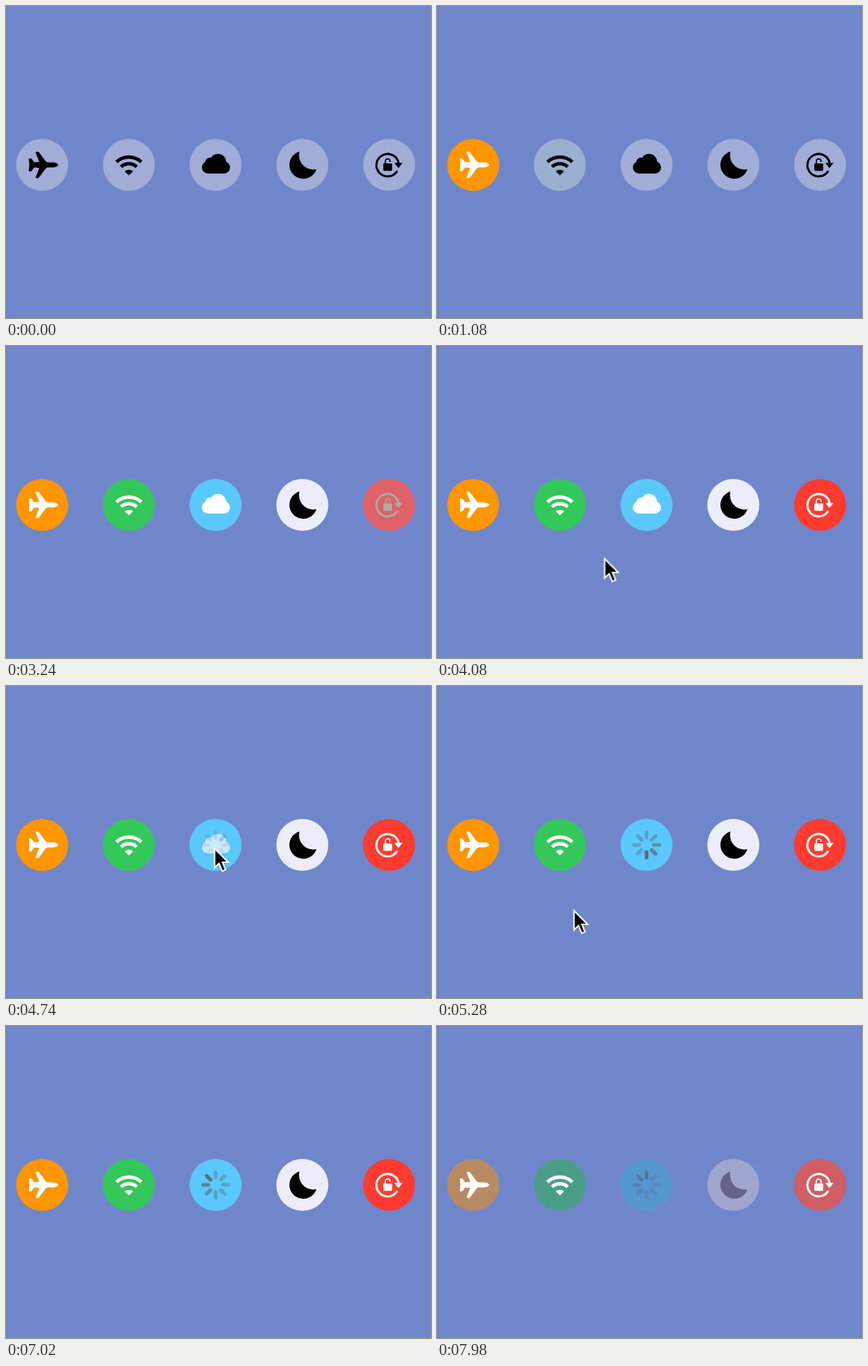
An HTML page for the animation above (8000 ms loop, 588x432 px).

```html
<!DOCTYPE html>
<html lang="en">
<head>
<meta charset="utf-8">
<title>Control toggles</title>
<style>
  html, body { margin: 0; width: 100%; height: 100%; overflow: hidden; background: #7086ca; }
  svg { display: block; width: 588px; height: 432px; }

  /* Each toggle: fill is the disc, color is the icon. */
  .toggle { animation: 8s linear infinite; fill: #a1acd7; color: #000; }
  .icon { fill: currentColor; }
  .line { fill: none; stroke: currentColor; }
  #plane { animation-name: plane; }
  #wifi { animation-name: wifi; }
  #cloud { animation-name: cloud; }
  #moon { animation-name: moon; }
  #lock { animation-name: lock; }

  @keyframes plane {
    0%, 4.25% { fill: #a1acd7; color: #000; animation-timing-function: ease; }
    8.3%, 96.25% { fill: #ff9500; color: #fff; }
    100% { fill: #b38969; color: #fff; }
  }
  @keyframes wifi {
    0%, 13.25% { fill: #a1acd7; color: #000; animation-timing-function: ease; }
    16.7%, 96.25% { fill: #34c759; color: #fff; }
    100% { fill: #4b9b8c; color: #fff; }
  }
  @keyframes cloud {
    0%, 21.5% { fill: #a1acd7; color: #000; animation-timing-function: ease; }
    25%, 96.25% { fill: #5ac8fa; color: #fff; }
    100% { fill: #5593cc; color: #fff; }
  }
  @keyframes moon {
    0%, 29.75% { fill: #a1acd7; color: #000; animation-timing-function: ease; }
    33.25%, 96.25% { fill: #ecedf9; color: #000; }
    100% { fill: #9ba0cd; color: #6b6a94; }
  }
  @keyframes lock {
    0%, 39.5% { fill: #a1acd7; color: #000; animation-timing-function: ease; }
    42.1%, 96.25% { fill: #ff3b30; color: #fff; }
    100% { fill: #ce5f69; color: #fff; }
  }

  .open { animation: open 8s step-end infinite; }
  .closed { animation: closed 8s step-end infinite; }
  @keyframes open { 0%, 39.7% { opacity: 1; } 29.95%, 96.7%, 100% { opacity: 0; } }
  @keyframes closed { 0%, 39.7% { opacity: 0; } 29.95%, 96.7%, 100% { opacity: 1; } }

  .puff { animation: puff 8s linear infinite; }
  @keyframes puff { 0%, 58.25% { opacity: 1; } 61.25%, 100% { opacity: 0; } }

  .loader { animation: load 8s linear infinite; }
  @keyframes load {
    0%, 58.25% { opacity: 0; }
    61.25%, 96.25% { opacity: 1; }
    100% { opacity: .6; }
  }
  .spin { animation: spin 8s linear infinite; fill: #555a66; }
  @keyframes spin {
    0%, 58.375% { transform: rotate(0deg); animation-timing-function: steps(56); }
    93.375%, 100% { transform: rotate(2520deg); }
  }

  .pointer { animation: travel 8s linear infinite, show 8s step-end infinite; }
  @keyframes travel {
    0%, 48% { transform: translate(-4px, 352px); }
    51% { transform: translate(230px, 292px); animation-timing-function: ease-out; }
    54.75%, 62.5% { transform: translate(287px, 222px); animation-timing-function: ease-in; }
    66% { transform: translate(189px, 308px); }
    67.5% { transform: translate(67px, 310px); }
    68.2%, 100% { transform: translate(-10px, 310px); }
  }
  @keyframes show { 0%, 68.1%, 100% { opacity: 0; } 47.95% { opacity: 1; } }
</style>
</head>
<body>
<svg viewBox="0 0 588 432">
  <defs>
    <circle id="disc" r="36"/>
    <path id="wing" d="M22 -.5V0C22 2.5 17 3.5 14 3.5H8Q6 3.5 4.5 5.5L-4 17Q-5 18.2-6 18.2H-8Q-9.4 18.2-8.8 16.6L-4 4.2-11 3.4-14.6 8.4Q-15 9-16 9H-17.6Q-18.5 9-18.4 8L-17.6-.5Z"/>
    <rect id="spoke" x="-2.5" y="-20" width="5" height="12.5" rx="2.5"/>
  </defs>

  <g id="plane" class="toggle" transform="translate(50 220)">
    <use href="#disc"/>
    <g class="icon">
      <use href="#wing"/>
      <use href="#wing" transform="scale(1 -1)"/>
    </g>
  </g>

  <g id="wifi" class="toggle" transform="translate(170 220)">
    <use href="#disc"/>
    <path class="line" stroke-width="4.8" d="M-17.2-4A25 25 0 0 1 17.2-4M-10.8 2.7A15.6 15.6 0 0 1 10.8 2.7"/>
    <path class="icon" d="M0 14.5-5.8 8.9A8.6 8.6 0 0 1 5.8 8.9Z"/>
  </g>

  <g id="cloud" class="toggle" transform="translate(290 220)">
    <use href="#disc"/>
    <g class="puff">
      <g class="icon">
        <rect x="-19" y="-5" width="39" height="17" rx="8.5"/>
        <circle cx="3.3" cy="-4" r="11.2"/>
        <circle cx="-7.5" cy="-3.2" r="7"/>
      </g>
    </g>
    <g class="loader">
      <g class="spin">
        <use href="#spoke" opacity=".85"/>
        <use href="#spoke" opacity=".65" transform="rotate(-45)"/>
        <use href="#spoke" opacity=".5" transform="rotate(-90)"/>
        <use href="#spoke" opacity=".4" transform="rotate(-135)"/>
        <use href="#spoke" opacity=".35" transform="rotate(180)"/>
        <use href="#spoke" opacity=".35" transform="rotate(135)"/>
        <use href="#spoke" opacity=".35" transform="rotate(90)"/>
        <use href="#spoke" opacity=".35" transform="rotate(45)"/>
      </g>
    </g>
  </g>

  <g id="moon" class="toggle" transform="translate(410 220)">
    <use href="#disc"/>
    <path class="icon" d="M-4-18.5A19.2 19.2 0 1 0 19.5 6A20 20 0 0 1-4-18.5Z"/>
  </g>

  <g id="lock" class="toggle" transform="translate(530 220)">
    <use href="#disc"/>
    <path class="line" stroke-width="3" d="M13.3-2A15.5 15.5 0 1 0 11.4 8.2"/>
    <path class="icon" d="M7.3-2.7H18.6L13 4.6Z"/>
    <rect class="icon" x="-8" y="-2" width="12.2" height="10.2" rx="1.2"/>
    <g class="line" stroke-width="1.7">
      <path class="open" d="M-5.2-1.5V-5A3.3 3.3 0 0 1 1.4-5V-4"/>
      <path class="closed" d="M-5.2-1.5V-4.6A3.3 3.3 0 0 1 1.4-4.6V-1.5"/>
    </g>
  </g>

  <g class="pointer">
    <path d="M3 5V31L9 25.5 13.5 36 18 34 13.5 23.8H21.5Z" fill="#000" opacity=".2"/>
    <path d="M1.6 3V29.6L7.8 23.8 12.2 34.4 16.8 32.4 12.4 22H20.4Z" fill="#000" stroke="#fff" stroke-width="2"/>
  </g>
</svg>
</body>
</html>
```
